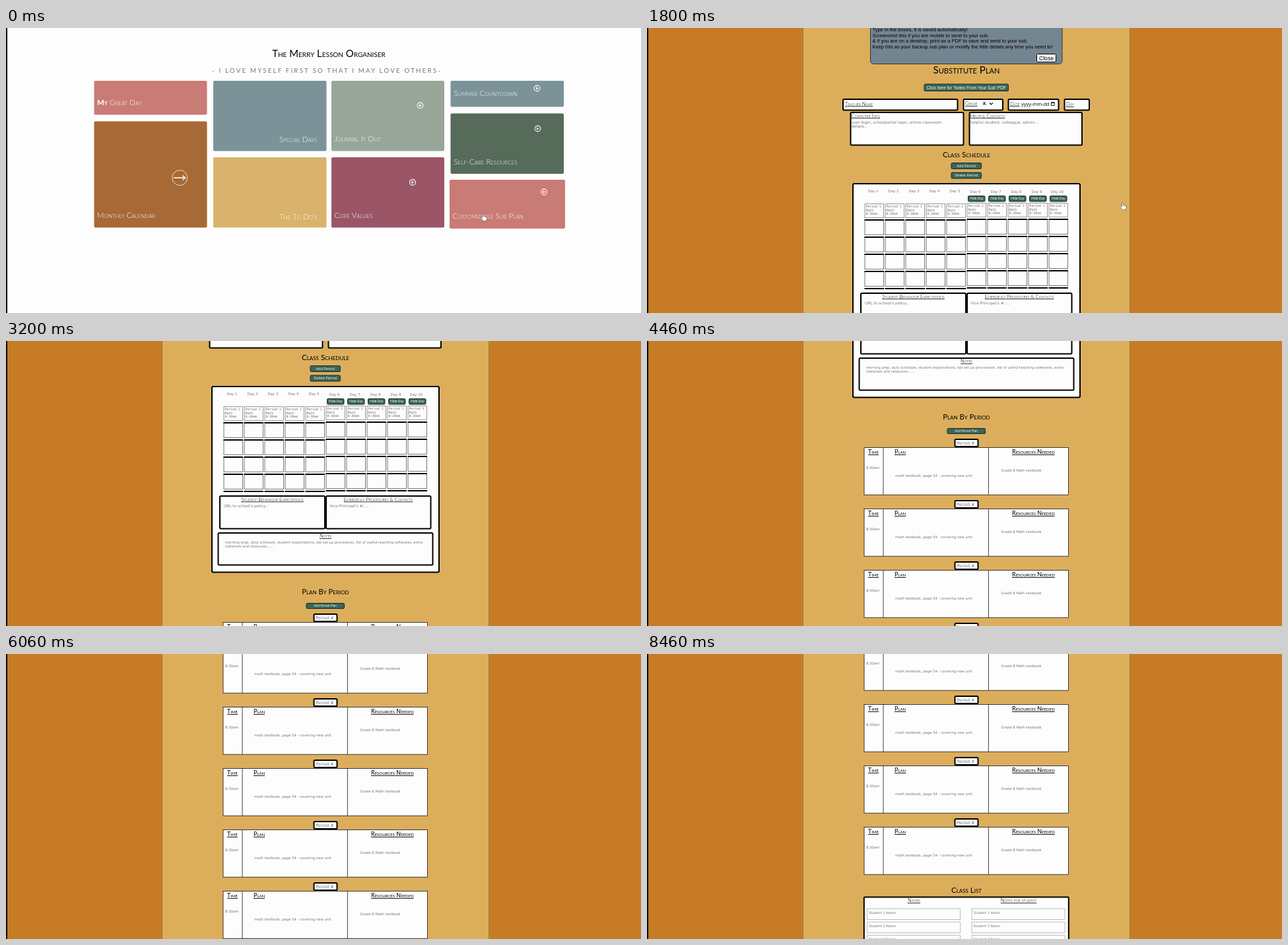
An HTML page for the animation above (8600 ms loop, 962x432 px).

```html
<!DOCTYPE html>
<html lang="en">
<head>
<meta charset="utf-8">
<title>Lesson organiser</title>
<style>
  html, body { margin: 0; width: 100%; height: 100%; overflow: hidden; background: #fdfdfd; }
  svg { display: block; }
  text { white-space: pre; }
  .caps { font-family: Lato, sans-serif; font-variant: small-caps; }
  .light { font-weight: 300; }
  .line { text-decoration: underline; }
  .mid { text-anchor: middle; }
  .dv { font-family: "DejaVu Sans", sans-serif; fill: #777; }
  .mono { font-family: "DejaVu Sans Mono", monospace; fill: #666; }
  .arial { font-family: "Liberation Sans", Arial, sans-serif; }
  .open { font-family: "Open Sans", sans-serif; }
  .white { fill: #fff; }
</style>
</head>
<body>
<svg width="962" height="432" viewBox="0 0 962 432">
  <g id="home"></g>
  <g id="plan">
    <rect width="962" height="432" fill="#c87b25"/>
    <rect x="236.5" y="-2" width="495" height="436" fill="#dcae5c" stroke="#94803f"/>
    <g id="page"></g>
  </g>
  <path id="hand" d="M-1.5 1V-4q0-1 1-1t1 1V-1.2q1.1-.6 1.7.3 1-.4 1.5.4 1.3-.3 1.3 1V2.5L4 5.5H-.5L-4 1.5q.3-1.3 1.4-.9z"
        fill="#fff" stroke="#444" stroke-width=".6"/>
  <rect width="2" height="432"/>
</svg>
<script>
const $ = id => document.getElementById(id);
const GREEN = '#3a6558';

// Box given by its outer edges, with the stroke kept inside.
const box = (x1, y1, x2, y2, fill = '#fdfdfd', stroke = '#000', w = 1, r = 0) =>
  `<rect x="${x1 + w / 2}" y="${y1 + w / 2}" width="${x2 - x1 - w}" height="${y2 - y1 - w}" rx="${r}"
    fill="${fill}" stroke="${stroke}" stroke-width="${w}"/>`;
const text = (x, y, size, cls, str) =>
  `<text x="${x}" y="${y}" font-size="${size}" class="${cls}">${str}</text>`;
const field = (x1, y1, x2, y2) => box(x1, y1, x2, y2, '#fdfdfd', '#000', 2, 1.5);
const label = (x, y, str, cls = '') => text(x, y, 7.6, 'caps light line ' + cls, str);
const heading = (y, str, size = 11.2) => text(484, y, size, 'caps mid', str);
const button = (x1, y1, x2, y2, str, size, cls = 'open') =>
  box(x1, y1, x2, y2, GREEN, '#1c2b26', 1, 1.5) +
  text((x1 + x2) / 2, (y1 + y2) / 2 + size * .36, size, cls + ' mid white', str);

function drawHome() {
  const tile = (x1, y1, x2, y2, fill, tx, ty, str, size = 11.4) =>
    box(x1, y1, x2, y2, fill, 'none', 0, 2) + text(tx, ty, size, 'caps light white', str);
  const play = (x, y) => `<g transform="translate(${x} ${y})">
    <circle r="4.4" fill="none" stroke="#fff" stroke-width="1.1"/><path d="M-1.5-2.3L2.3 0L-1.5 2.3z" fill="#fff"/></g>`;
  return text(489, 43.5, 14.9, 'caps mid', 'The Merry Lesson Organiser') +
    `<g letter-spacing="2.15" fill="#777">${text(312, 68, 9.8, 'caps', '- I LOVE MYSELF FIRST SO THAT I MAY LOVE OTHERS-')}</g>` +
    tile(133.5, 80, 304.5, 131.5, '#c97b75', 138, 117, '<tspan font-weight="700">My</tspan> Great Day') +
    tile(133.5, 141.5, 304.5, 302.5, '#a76935', 138, 288, 'Monthly Calendar') +
    tile(314, 80, 485.5, 186.5, '#7b9299', 414, 173, 'Special Days') +
    tile(314, 196, 485.5, 302.5, '#d9b36b', 414, 289.5, "The To Do's") +
    tile(493, 80, 664, 186.5, '#97a698', 497.5, 171.5, 'Journal It Out') +
    tile(493, 196, 664, 302.5, '#9a5666', 497.5, 288, 'Core Values') +
    tile(673.5, 80, 845, 119.5, '#7b9299', 678.5, 102.5, 'Summer Countdown') +
    tile(673.5, 129.5, 845, 221, '#566b5a', 678.5, 206.5, 'Self-Care Resources') +
    tile(672, 230, 847, 304, '#c97b75', 676.5, 289, 'Customizable Sub Plan', 11.7) +
    play(627.5, 117.5) + play(616, 234) + play(804.5, 91.5) + play(805.5, 152.5) + play(815, 248.5) +
    `<g fill="none" stroke="#eadfd3"><circle cx="263.3" cy="227" r="11.5"/>
      <path d="M254 227H271M267.5 223.5L271.5 227L267.5 230.5" stroke-width="1.8"/></g>`;
}

function drawForm() {
  const tips = ['Type in the boxes, it is saved automatically!', 'Screenshot this if you are mobile to send to your sub',
    '&amp; if you are on a desktop, print as a PDF to save and send to your sub.',
    'Keep this as your backup sub plan or modify the little details any time you need to!'];
  return box(338, -12, 629.5, 55, '#748592', '#333', 1, 5) +
    tips.map((tip, i) => text(341.5, 5 + 8.5 * i, 7.5, 'arial', tip)).join('') +
    box(590, 39, 620, 52, '#fdfdfd', '#000', 1, 1) + text(605, 48.5, 8.6, 'arial mid', 'Close') +
    heading(69, 'Substitute Plan', 15.2) +
    button(419.5, 84.5, 548, 96, "Click here for 'Notes From Your Sub' PDF", 6.55, 'arial') +
    field(296, 107, 471.5, 125.5) + label(300, 117.5, 'Teacher Name') +
    field(478.5, 107, 540, 125.5) + label(482, 117, 'Grade') + text(509, 117.3, 7.5, 'open', '<tspan font-weight="600">K</tspan>') +
    '<path d="M519 113.3l2.5 2.5 2.5-2.5" fill="none" stroke="#000" stroke-width="1.2"/>' +
    field(546.5, 107, 624.5, 125.5) + label(550, 117.5, 'Date') + text(567, 117.5, 7.4, 'open', 'yyyy-mm-dd') +
    box(612, 112.3, 617.5, 118, 'none', '#000', .8) + '<path d="M612 113.3h5.5" stroke="#000"/>' +
    field(631.5, 107, 671, 125.5) + label(635, 118, 'Day') +
    field(307.5, 127, 480.5, 178.5) + label(309.5, 135.5, 'Computer Info') +
    text(310, 144.5, 5.8, 'dv', 'user login, schoolportal login, online classroom') + text(310, 151, 5.8, 'dv', 'details..') +
    field(487.5, 127, 660, 178.5) + label(489.5, 135.5, 'Helpful Contacts') +
    text(490, 144.5, 5.8, 'dv', 'helpful student, colleague, admin...');
}

function drawSchedule() {
  let out = heading(195.7, 'Class Schedule', 11.7) +
    button(460.5, 204, 507, 214, 'Add Period', 5.5) + button(460.5, 218.5, 507, 228.5, 'Delete Period', 5.5) +
    box(311, 235, 657, 518.5, '#fdfdfd', '#000', 2, 2);
  for (let i = 0; i < 10; i++) {
    const x = 329.5 + 31 * i, late = i > 4, top = late ? 265 : 266;
    out += text(x + 13, late ? 249.5 : 249, 5.5, 'dv mid', 'Day ' + (i + 1));
    if (late) out += button(x + 1.5, 254, x + 28, 263.5, 'Hide Day', 4.8);
    out += box(x, top, x + 29.5, top + 22, '#fdfdfd', '#999');
    ['Period 1', 'Math', '8:30am'].forEach((s, k) => out += text(x + 2, top + 6 + 5.5 * k, 4.8, 'mono', s));
    for (let row = 0; row < 5; row++) {
      const y = top + 24 + 26 * row;
      if (row < 4) out += box(x, y, x + 29.5, y + 24, '#fdfdfd', '#777');
      out += box(x, y, x + 29.5, y + 2, '#000', 'none', 0);
    }
  }
  return out +
    field(323, 401, 484, 452.5) + label(403.5, 409.5, 'Student Behaviour Expectations', 'mid') +
    text(330, 418.5, 5.8, 'dv', "URL to school's policy...") +
    field(484, 401, 644.5, 452.5) + label(564, 409.5, 'Emergency Procedures &amp; Contacts', 'mid') +
    text(490.5, 418.5, 5.8, 'dv', "Vice Principal's #:....") +
    field(320.5, 457, 647.5, 507.5) + label(484, 465.3, 'Notes', 'mid') +
    text(332, 473.5, 5.25, 'dv', 'morning prep, duty schedule, student expectations, lab set up procedures, list of useful teaching softwares, extra') +
    text(332, 480, 5.25, 'dv', 'materials and resources......');
}

function drawPeriods() {
  let out = heading(551, 'Plan By Period') + button(454.5, 564, 513, 573, 'Add Period Plan', 4.7);
  for (let i = 0; i < 7; i++) {
    const y = 593 + 93 * i, title = (x, s) => text(x, y + 10, 9, 'caps line', s);
    out += field(465.5, y - 13, 502.5, y) + text(469.5, y - 4, 6.3, 'dv', 'Period #') +
      box(328.6, y, 639, y + 72.6, '#fdfdfd', '#111', .8) +
      `<path d="M358 ${y}v72M517.4 ${y}v72" stroke="#111" stroke-width=".8"/>` +
      title(335, 'Time') + title(375, 'Plan') + title(553, 'Resources Needed') +
      text(332, y + 33, 5.3, 'dv', '8:30am') +
      text(376, y + 44.5, 5.3, 'dv', 'math textbook, page 54 - covering new unit') +
      text(536.5, y + 37, 5.3, 'dv', 'Grade 8 Math textbook');
  }
  return out;
}

function drawClassList() {
  let out = heading(1250.5, 'Class List', 11.5) + box(327.8, 1256.5, 639.8, 1400, '#fdfdfd', '#000', 2, 1) +
    label(404.5, 1265, 'Names', 'mid') + label(563, 1265, 'Notes for student', 'mid');
  for (let i = 0; i < 3; i++) {
    const y = 1274.5 + 20.2 * i;
    [[333, 'Name'], [491.5, 'Notes']].forEach(([x, s]) =>
      out += box(x, y, x + 142, y + 17.5, '#fdfdfd', '#bbb') + text(x + 3, y + 8, 5, 'dv', `Student ${i + 1} ${s}`));
  }
  return out;
}

$('home').innerHTML = drawHome();
$('page').innerHTML = drawForm() + drawSchedule() + drawPeriods() + drawClassList();

const LOOP = 8600, FPS = 15, OPEN = 330, HAND_GONE = 2130;

// Scroll offset by step (15 a second), joined by a smooth curve.
const stops = [[17, -16], [27, 0], [48, 167], [67, 432], [80, 608], [101, 889]];
function scrollAt(step) {
  const last = stops.length - 1;
  if (step <= stops[0][0]) return stops[0][1];
  if (step >= stops[last][0]) return stops[last][1];
  const i = stops.findIndex(s => s[0] > step) - 1;
  const slope = k => k < 1 || k >= last ? 0 :
    (stops[k + 1][1] - stops[k - 1][1]) / (stops[k + 1][0] - stops[k - 1][0]);
  const [s0, a] = stops[i], [s1, b] = stops[i + 1], d = s1 - s0, u = (step - s0) / d;
  return a + (b - a) * u * u * (3 - 2 * u) + d * u * (1 - u) * (slope(i) * (1 - u) - slope(i + 1) * u);
}

function draw(now) {
  // Steps start on whole hundredths of a second, so allow for rounding.
  const t = now % LOOP, step = Math.floor((t + 10) * FPS / 1000);
  const u = Math.min(step / 27, 1);
  $('home').style.display = t < OPEN ? '' : 'none';
  $('plan').style.display = t < OPEN ? 'none' : '';
  $('page').setAttribute('transform', `translate(0 ${-Math.round(scrollAt(step))})`);
  $('hand').setAttribute('transform', `translate(${723.5 - 2.5 * u} ${287 - 17 * u})`);
  $('hand').style.display = t < HAND_GONE ? '' : 'none';
}
const start = performance.now();
(function tick() {
  draw(performance.now() - start);
  requestAnimationFrame(tick);
})();
</script>
</body>
</html>
```
